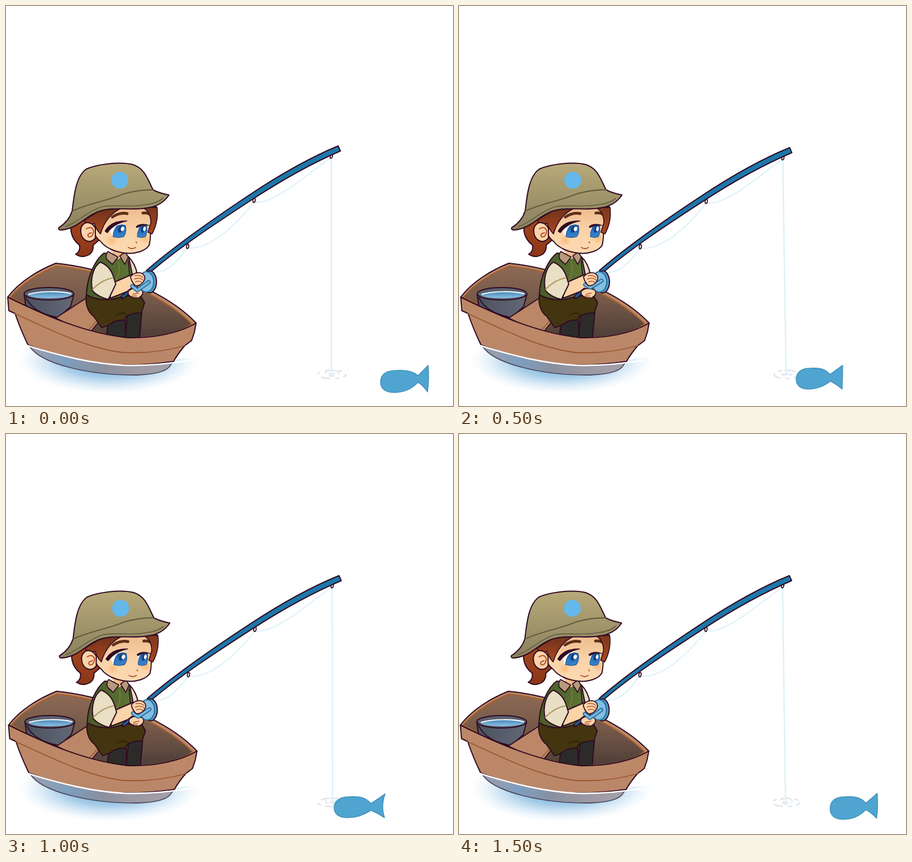
Recreate the animation shown at these times as an HTML page with a canvas. Size 790x709 px, loop 1600 ms.

```html
<!DOCTYPE html>
<html lang="en">
<head>
<meta charset="utf-8">
<title>Fishing from a boat</title>
<style>
html, body { margin: 0; width: 100%; height: 100%; overflow: hidden; background: #fff; }
canvas { display: block; }
</style>
</head>
<body>
<canvas id="stage" width="790" height="709"></canvas>
<script>
const ctx = document.getElementById('stage').getContext('2d');
const INK = '#300a22', SKIN = '#fad3a8', WOOD = '#bb8766', GRAIN = '#98562c';
const LOOP = 1600, STEP = 100, SWAY = 800;

function shape(d, fill, stroke = INK, width = 2) {
  const path = new Path2D(d);
  if (fill) { ctx.fillStyle = fill; ctx.fill(path); }
  if (stroke) { ctx.strokeStyle = stroke; ctx.lineWidth = width; ctx.stroke(path); }
}
const line = (d, color = INK, width = 2) => shape(d, null, color, width);

function oval(x, y, rx, ry, fill, stroke, width = 2, tilt = 0) {
  ctx.beginPath();
  ctx.ellipse(x, y, rx, ry, tilt, 0, Math.PI * 2);
  if (fill) { ctx.fillStyle = fill; ctx.fill(); }
  if (stroke) { ctx.strokeStyle = stroke; ctx.lineWidth = width; ctx.stroke(); }
}

function blend(x0, y0, x1, y1, ...colors) {
  const g = ctx.createLinearGradient(x0, y0, x1, y1);
  colors.forEach((c, i) => g.addColorStop(i / (colors.length - 1), c));
  return g;
}

function clipped(d, draw) {
  ctx.save();
  ctx.clip(new Path2D(d));
  draw();
  ctx.restore();
}

// Linear interpolation between rows of [time, ...values].
function track(rows, t) {
  const i = Math.max(1, rows.findIndex(r => r[0] >= t));
  const a = rows[i - 1], b = rows[i], k = (t - a[0]) / (b[0] - a[0]);
  return a.slice(1).map((v, n) => v + (b[n + 1] - v) * k);
}

function waterGlow() {
  clipped('M0 590L42 603Q150 640 290 634Q305 620 345 625V709H0Z', () => {
    ctx.translate(182, 628);
    ctx.scale(1, 0.37);
    const g = ctx.createRadialGradient(0, 0, 20, 0, 0, 162);
    g.addColorStop(0, 'rgba(70,148,206,.85)');
    g.addColorStop(.45, 'rgba(82,156,212,.5)');
    g.addColorStop(.75, 'rgba(110,175,222,.2)');
    g.addColorStop(1, 'rgba(180,220,240,0)');
    oval(0, 0, 162, 162, g);
  });
}

function boatInside() {
  shape('M3 516C24 488 58 468 88 456Q118 459 147 466C215 481 293 516 336 562C318 580 262 590 215 588C140 580 70 548 3 516Z', WOOD);
  shape('M8 516C28 491 62 472 89 461Q118 464 147 471C210 486 285 520 328 563C310 580 262 588 215 588C140 580 70 548 8 516Z',
    blend(0, 460, 0, 590, '#8d6a55', '#745848', '#4c3d37'), '#a4602e');
  bucket();
  shape('M88 553L146 515L190 528L167 556L150 577Q115 568 88 553Z', WOOD, INK, 1.8);
  line('M165 553L147 573', GRAIN, 1.5);
}

function bucket() {
  shape('M32 510L35 533Q62 547 92 553L114 533L120 511Z', blend(32, 0, 120, 0, '#4b515e', '#626876'));
  oval(76, 510, 44, 11, '#5b6170', INK);
  oval(77, 512, 38, 6, blend(0, 505, 0, 519, '#3e7fae', '#94c8eb'));
  line('M40 511C60 505 97 505 115 510', '#fff', 2);
  line('M35 517Q49 544 88 551', INK, 1.7);
}

function hull() {
  shape('M41 602C60 635 150 655 231 654C264 653 282 648 289 639L296 629Q170 650 41 602Z',
    blend(42, 0, 290, 0, '#a09da9', '#7e9fbf', '#898f9f', '#9c99a3', '#a3a0a8'), '#4d4a5c', 1.8);
  const side = 'M3 516C70 549 140 580 215 588C262 589 306 580 336 562L333 578L328 593L316 602Q304 616 296 630Q240 638 195 636C142 632 88 619 39 601Q25 572 16 545L5 540Z';
  shape(side, blend(0, 530, 0, 640, WOOD, '#bc8868', '#b98668'));
  line('M15 545C75 572 140 606 205 614Q265 617 316 602', GRAIN, 1.8);
  line('M38 602C95 620 150 634 210 637Q265 638 326 628', '#fff', 2.6);
}

function legs() {
  shape('M181 555Q194 550 211 556L212 588Q195 587 178 582Z', '#2c2b2a');
  shape('M215 544Q226 538 240 543L236 588Q224 590 211 588Z', '#2c2b2a');
  shape('M143 509C138 526 145 543 155 550L169 570Q179 568 190 560Q200 556 209 557Q213 544 239 544L245 526L238 514L180 514Z', '#43350f');
  line('M195 548Q207 541 214 547', '#261d08', 1.3);
}

function torso() {
  shape('M216 444Q229 457 232 476L219 480Z', '#e5dec5');
  shape('M173 438C158 449 143 480 142 512Q163 523 187 520L220 512L225 485L217 445L200 441Z', blend(145, 0, 220, 0, '#485d29', '#5c7334'));
  line('M199 454Q203 471 194 488', '#7f7a35', 2);
  line('M216 452L219 482', INK, 1.7);
  shape('M184 432L211 432L208 444L198 449Z', '#efbd8c', null);
  shape('M180 435Q175 442 178 449L188 458L198 445Z', '#b69a7b', INK, 1.7);
  shape('M201 443L210 458L216 445L211 436Z', '#b69a7b', INK, 1.7);
  shape('M186 492L222 476L239 486L230 500L184 518Z', SKIN);
  shape('M167 454Q184 461 190 480L194 493L181 520Q163 516 153 505C148 484 154 462 167 454Z', '#e8dfc4');
  line('M153 502Q170 485 188 482', '#ae9560', 1.8);
}

function rod(dx, dy) {
  ctx.save();
  ctx.transform(1 + dx / 340, dy / 340, 0, 1, -dx * 250 / 340, -dy * 250 / 340);
  const thread = 'M262 472C286 472 301 455 319 430M322 429C359 431 402 394 437 349M440 348C476 350 530 300 574 269';
  line(thread, '#def2f9', 2.2);
  for (const [x, y] of [[321, 426], [438.5, 344.5], [575, 266]]) {
    oval(x, y, 2, 4, '#fff', INK, 1.8, .2);
  }
  shape('M248 469C298 425 367 377 430 335C484 299 534 270 587 248L591 257C540 279 490 307 435 343C374 383 304 429 254 473Z', '#1d77aa');
  ctx.restore();
}

function reelAndHands(phase) {
  line('M206 516L222 503', INK, 7);
  line('M207 515L222 503', '#1d5d94', 4);
  shape('M216 506Q224 497 239 503Q246 510 235 517Q222 519 216 511Z', SKIN, INK, 1.7);
  line('M224 511L234 509M223 514L231 514', '#b55435', 1.4);
  oval(254, 489, 12, 19.5, '#4e98c6', INK);
  oval(248, 489, 13, 18, '#82bfe1', '#286a98', 1.8);
  const lift = 3 * Math.cos(phase);
  const crank = `M223 ${495 + lift / 2}L232 ${501 + lift}L252 ${488 + lift / 2}`;
  line(crank, '#245f91', 7);
  line(crank, '#73b7df', 4);
  shape('M220 480Q227 471 238 473Q247 476 245 485Q240 496 229 496Q222 490 220 480Z', SKIN, INK, 1.7);
  line('M228 478Q237 476 242 481M227 484Q236 480 243 486M229 489Q236 486 240 490', '#b55435', 1.5);
}

// A slanted iris, flat at the lower lid.
function eye(x, y, width) {
  ctx.save();
  ctx.translate(x, y);
  ctx.scale(width / 24, 1);
  shape('M-5 -9Q4 -13 10 -10Q13 2 7 10Q-3 13 -12 10Q-12 -1 -5 -9Z',
    blend(0, -11, 0, 11, '#1b559d', '#2b74c0', '#3b82c6'), '#214d80', 1);
  oval(1, -3, 4, 6, '#143f7c', null, 0, .35);
  oval(5, -4, 3, 4, '#fff', null, 0, .35);
  ctx.restore();
}

function head() {
  shape('M119 374C111 391 113 411 130 424Q132 435 123 440Q135 448 148 440Q155 434 154 424L170 410L160 370Z', blend(0, 375, 0, 445, '#a2461e', '#8c3618'));
  shape('M151 373C149 395 158 411 167 417C176 429 193 436 211 438C229 440 247 434 253 424Q256 411 255 400Q266 383 266 356L180 352Z',
    blend(0, 360, 0, 438, '#efbd8f', SKIN, '#fcd9b1'));
  for (const [x, y] of [[187, 416], [246, 412]]) {
    const g = ctx.createRadialGradient(x, y, 0, x, y, 11);
    g.addColorStop(0, 'rgba(248,168,92,.55)');
    g.addColorStop(1, 'rgba(248,168,92,0)');
    oval(x, y, 11, 8, g);
  }
  shape('M183 396Q191 386 210 386L207 408L188 408Z', '#fff', null);
  shape('M232 394Q240 387 249 389L247 408L233 408Z', '#fff', null);
  eye(201, 399, 24);
  eye(241, 399, 18);
  shape('M175 399Q186 380 214 381Q192 385 179 402Z', INK, INK, 1.2);
  shape('M230 391Q239 384 253 389Q240 387 232 393Z', INK, INK, 1.2);
  line('M188 374Q202 365 214 368', '#61301a', 5);
  line('M242 367Q252 366 258 372', '#61301a', 5);
  line('M230 418L231 420', '#c06c48', 2);
  line('M216 428Q223 432 229 428', '#a84d32', 1.8);
  shape('M138 380Q160 365 180 356L205 358Q177 370 167 404Q158 394 156 385L146 390Z', blend(0, 360, 0, 400, '#70321b', '#a5471f'), INK, 1.6);
  shape('M241 357Q256 364 256 384L251 401L258 404Q270 382 267 357Z', blend(0, 357, 0, 404, '#7b381d', '#a8491f'), INK, 1.6);
  shape('M158 394C150 378 132 382 132 399C133 417 150 423 158 411Z', SKIN);
  line('M142 395Q152 389 155 399Q153 411 146 409Q142 404 151 402', '#b85030', 2);
}

function hat() {
  shape('M117 363C120 338 123 302 142 289C159 281 200 275 224 281C246 288 250 307 260 326Q272 332 288 335Q275 355 248 358C223 363 190 355 164 364C139 373 127 395 97 397Q92 397 93 393Q111 382 117 363Z',
    blend(0, 278, 0, 397, '#b8aa79', '#a0956b', '#8a805f'));
  line('M118 363C145 350 184 344 208 333Q237 325 260 326', '#655d40', 2.1);
  line('M105 391C127 384 143 364 169 356C193 351 222 358 247 352Q267 350 277 341', '#655d40', 1.7);
  oval(201, 309, 15, 15, '#64b8ec');
}

function fishingLine(top, bottom) {
  line(`M${top[0]} ${top[1]}L${bottom} 653`, '#dcf1f8', 2.4);
}

function ripples(x, t) {
  const age = ((t + 500) % SWAY) / SWAY;
  const outer = 20 + 8 * age;
  ctx.setLineDash([14, 9, 5, 11]);
  ctx.lineDashOffset = 12 * age;
  oval(x, 653, outer, 7.5, null, '#dfe0e9', 2.2);
  ctx.setLineDash([9, 8]);
  oval(x, 651, 8 + 6 * age, 5, null, '#e2e5ed', 2);
  ctx.setLineDash([]);
  line(`M${x - 5} 652Q${x} 654 ${x + 4} 652`, '#d8e8f2', 2.5);
}

// nose, waist, tail top x, right edge, notch, body top, body bottom, waist y, tail top, tail bottom
const pose = (nose, waist, right, notch, top, bottom, mid, tailTop, tailBottom) =>
  [nose, waist, right, notch, top, bottom, mid, tailTop, tailBottom];
const withdrawn = pose(662, 728, 746, 747, 646, 685, 660, 637, 684);
const bite = pose(578, 655, 682, 669, 645, 680, 657, 638, 676);
const recoil = pose(580, 645, 670, 666, 643, 680, 660, 638, 680);
const retreat = pose(596, 656, 678, 678, 642, 679, 658, 637, 679);
const adrift = pose(617, 679, 701, 697, 642, 679, 658, 636, 679);
const swim = [
  [0, ...withdrawn], [200, ...bite], [400, ...recoil], [500, ...retreat],
  [600, ...adrift], [800, ...bite], [1000, ...recoil], [1100, ...retreat], [1200, ...adrift],
  [1300, ...pose(635, 698, 718, 713, 642, 678, 657, 635, 678)],
  [1500, ...pose(656, 719, 739, 740, 643, 683, 659, 637, 681)],
  [1600, ...withdrawn]
];

function fish(t) {
  const [nose, waist, right, notch, top, bottom, mid, tailTop, tailBottom] = track(swim, t);
  const len = waist - nose, cy = (top + bottom) / 2 + 1;
  shape(`M${nose} ${cy}C${nose} ${top + 5} ${nose + len * .2} ${top} ${nose + len * .42} ${top}` +
    `C${nose + len * .75} ${top - 1} ${waist - 8} ${top + 3} ${waist} ${mid - 5}` +
    `Q${waist + (right - waist) * .5} ${mid - 13} ${right} ${tailTop}` +
    `Q${notch * 2 - right} ${mid} ${right - 1} ${tailBottom}` +
    `Q${waist + (right - waist) * .5} ${mid + 12} ${waist} ${mid + 7}` +
    `C${waist - 12} ${bottom - 5} ${nose + len * .62} ${bottom} ${nose + len * .36} ${bottom}` +
    `C${nose + len * .14} ${bottom} ${nose} ${bottom - 6} ${nose} ${cy}Z`, '#50a4d0', '#4393bd', 1.6);
}

// time, rod tip dx, rod tip dy, x of the line at the water
const cast = [
  [0, 0, 0, 575], [200, 0, 3, 577], [400, -2, 3, 578],
  [500, -2.7, 3, 578], [700, -2.5, 3, 577], [800, 0, 0, 575]
];

function render(t) {
  const beat = t % SWAY;
  const sway = .44 + 1.15 * Math.cos((beat - 250) / SWAY * Math.PI * 2);
  const [dx, dy, waterX] = track(cast, beat);
  ctx.fillStyle = '#fff';
  ctx.fillRect(0, 0, 790, 709);
  ctx.lineCap = ctx.lineJoin = 'round';
  waterGlow();
  ripples(waterX + 1, t);
  fishingLine([575 + sway + dx, 269 + dy], waterX);
  fish(t);
  ctx.save();
  ctx.translate(sway, 0);
  boatInside();
  legs();
  torso();
  head();
  hat();
  rod(dx, dy);
  reelAndHands(beat / SWAY * Math.PI * 2);
  hull();
  ctx.restore();
}

function tick() {
  render(Math.floor(performance.now() % LOOP / STEP) * STEP);
  requestAnimationFrame(tick);
}
tick();
</script>
</body>
</html>
```
